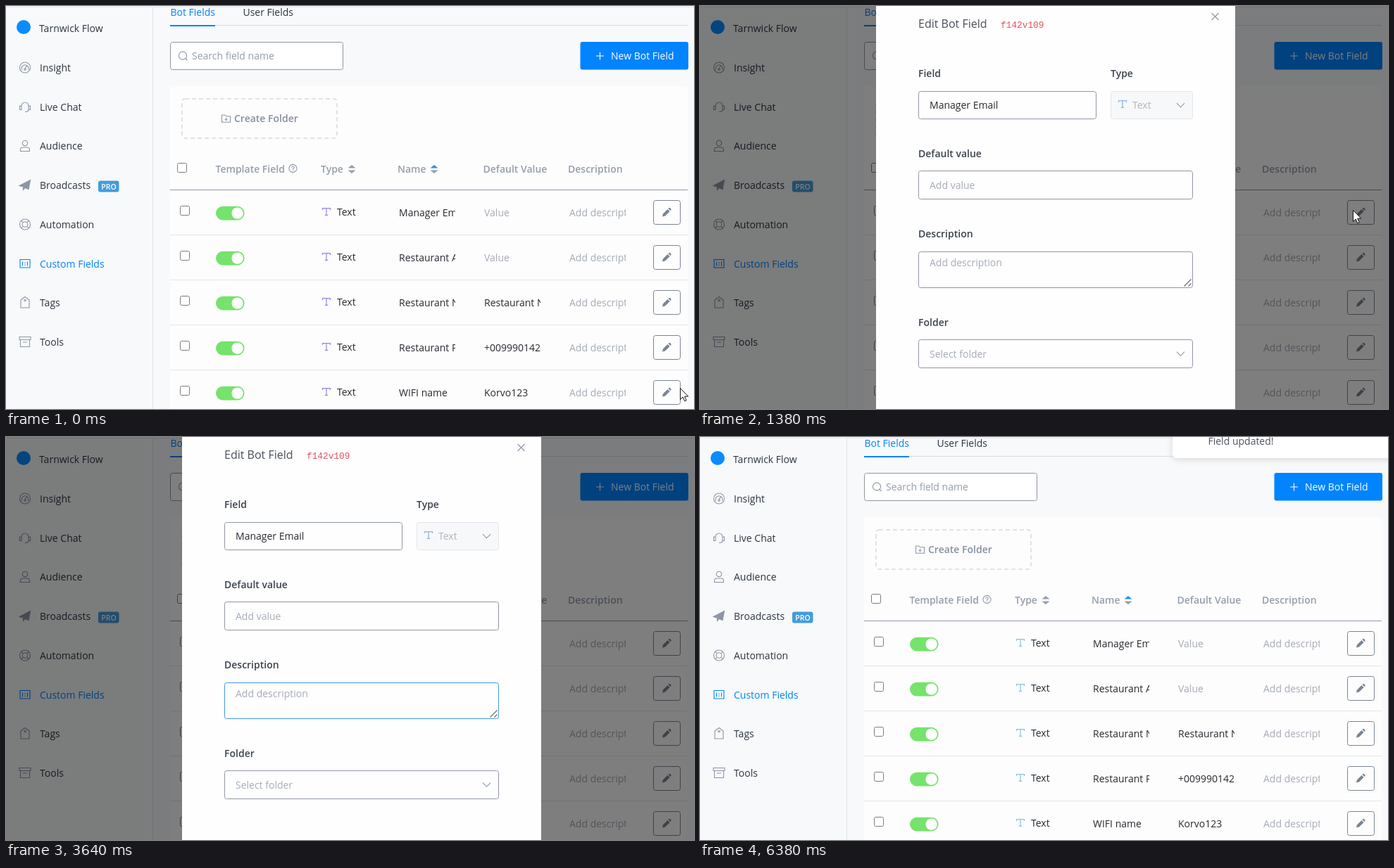
Animation of 977x573 px, one loop 7310 ms. Source, as an HTML page:

```html
<!DOCTYPE html>
<html lang="en">
<head>
<meta charset="utf-8">
<title>Edit bot field</title>
<style>
html, body { margin: 0; width: 100%; height: 100%; overflow: hidden; background: #f8f9fb; }
svg { display: block; }
#stage { position: absolute; left: 0; top: 0; }
text { font: 14px "Open Sans", sans-serif; white-space: pre; }
.bold { font-weight: 600; }
.line { fill: none; stroke: #8d96a5; stroke-width: 1.1; }
.tee { fill: none; stroke: #8f86ea; stroke-width: 1.2; }
.cool .tee { stroke: #86c2e6; }
.toast { filter: drop-shadow(0 2px 5px #0002); }
</style>
</head>
<body>
<svg id="stage" width="977" height="573" viewBox="0 0 977 573"></svg>
<script>
const BLUE = '#0084ff', INK = '#2d3541', DARK = '#272a30', MUTED = '#959eab', HINT = '#a6abb5', EDGE = '#8f97a5';
const PENCIL = '#7a8492';
const LOOP = 7310;

const text = (x, y, s, fill = INK, cls = '', more = '') =>
  `<text x="${x}" y="${y}" fill="${fill}" class="${cls}" ${more}>${s}</text>`;
const fillBox = (x, y, w, h, fill, r = 0, more = '') =>
  `<rect x="${x}" y="${y}" width="${w}" height="${h}" rx="${r}" fill="${fill}" ${more}/>`;
const box = (x, y, w, h, stroke = EDGE, r = 3, more = '', fill = 'none') =>
  fillBox(x + .5, y + .5, w - 1, h - 1, fill, r, `stroke="${stroke}" ${more}`);
const icon = (x, y, d, more = '') =>
  `<path class="line" transform="translate(${x} ${y})" d="${d}" ${more}/>`;
const rule = (y, color, x = 233, end = 968) => fillBox(x, y, end - x, 1, color);
const clipped = (x, y, s, fill) =>
  `<svg x="${x}" y="${y - 20}" width="80" height="30">${text(0, 20, s, fill)}</svg>`;
const circle = (r, x = 0, y = 0) => `M${x - r} ${y}a${r} ${r} 0 1 1 ${2 * r} 0a${r} ${r} 0 1 1 ${-2 * r} 0`;
const tee = (x, y, more = 'class="tee"') =>
  `<path ${more} transform="translate(${x} ${y})" d="M.5 3V.6H11.5V3M6 .6V10.4M3.8 10.4H8.2"/>`;
const sorter = (x, up) => `<g transform="translate(${x} 232)">
  <path d="M-5.5 -1.5L0 -6L5.5 -1.5Z" fill="${up}"/><path d="M-5.5 1.5L0 6L5.5 1.5Z" fill="${MUTED}"/></g>`;

function sidebar() {
  const items = [
    ['Tarnwick Flow'],
    ['Insight', circle(7.5) + 'M-4.5 3.5A5 5 0 1 1 4.5 3.5M0 2L2.5 -3' + circle(1.3, 0, 2.5)],
    ['Live Chat', 'M-5 1V-1.5A5 5 0 0 1 5 -1.5V1M-5 -1.5H-7.5V4H-5ZM5 -1.5H7.5V4H5ZM5 4Q5 7 0 7'],
    ['Audience', circle(3.7, 0, -3.6) + 'M-6.5 8V6Q-6.5 2.5 -3 2.5H3Q6.5 2.5 6.5 6V8Z'],
    ['Broadcasts', 'M-8 1L7.5 -7L5 6L0 4L-2.5 7V3L5 -4L-4 2.5Z', 'style="fill:#8d96a5"'],
    ['Automation', circle(7.5) + circle(3.8) + 'M-5.3 -5.3L-2.7 -2.7M5.3 -5.3L2.7 -2.7M-5.3 5.3L-2.7 2.7M5.3 5.3L2.7 2.7'],
    ['Custom Fields', 'M-7 -6H7V5.5H-7ZM-3.5 -3V3M3.5 -3V3M0 -2V-.5M0 1V2.5', `style="stroke:${BLUE}"`],
    ['Tags', 'M-6 -3.5L0 -8L6 -3.5V7.5H-6Z' + circle(1.2, 0, -3)],
    ['Tools', 'M-8 -7H8V-3H-8ZM-6.5 -3V7H6.5V-3M-3 .5H3']
  ];
  return fillBox(0, 0, 208, 573, '#f7f9fa') + fillBox(208, 2, 1, 571, '#e1e4e8') +
    items.map(([name, d, more], i) => {
      const y = Math.round(37 + 55.75 * i);
      const mark = d ? icon(27, y - 5.5, d, more) : `<circle cx="25" cy="30" r="10" fill="#0a8cff"/>`;
      return mark + text(i ? 48 : 47, y, name, i == 6 ? BLUE : INK);
    }).join('') +
    fillBox(131, 248.5, 29.5, 16, '#439bdc', 3) +
    text(146, 260.5, 'PRO', '#fff', 'bold', 'text-anchor="middle" style="font-size:10.5px"');
}

function row([name, value], i) {
  const pencil = 'M-6.5 6.5L-5.5 2.2L1.6 -5L5 -1.6L-2.2 5.5ZM2.6 -6L4 -7.2Q5 -7.6 6.3 -6.3Q7.6 -5 7.2 -4L6 -2.6Z';
  return `<g transform="translate(0 ${64 * i})">
    ${i ? rule(261, '#e2e5e9') : ''}
    ${box(247, 284, 14, 14, '#777c84', 2, '', '#fff')}
    ${fillBox(298, 284.8, 40.6, 19.6, '#75e36c', 9.8)}<circle cx="328.6" cy="294.6" r="8.2" fill="#fff"/>
    ${tee(449, 287)}${text(470, 298, 'Text', DARK)}
    ${clipped(558, 299, name, DARK)}
    ${clipped(679, 299, value || 'Value', value ? DARK : HINT)}
    ${clipped(800, 299, 'Add description', HINT)}
    <g id="edit${i}" fill="${PENCIL}">${box(919, 276, 39, 35, PENCIL)}
      <path transform="translate(938 293.5) scale(.92)" d="${pencil}"/></g></g>`;
}

function table() {
  const rows = [['Manager Email'], ['Restaurant Address'], ['Restaurant Name', 'Restaurant Name'],
    ['Restaurant Phone', '+009990142'], ['WIFI name', 'Korvo123']];
  const heads = [[297.5, 'Template Field'], [447, 'Type'], [556, 'Name'], [677.5, 'Default Value'], [798, 'Description']];
  return fillBox(233, 114, 735, 459, '#fdfdfd') +
    box(249.5, 131.5, 221, 57, '#d8dbdf', 4, 'stroke-width="1.6" stroke-dasharray="6 4"') +
    icon(312.5, 160, 'M-6 -5H-1.5L0 -3.2H6V5.2H-6ZM0 -1V3.4M-2.2 1.2H2.2') +
    text(324, 165, 'Create Folder', '#858f9e', 'bold') +
    box(243, 223, 14, 14, '#777c84', 2, '', '#fff') +
    heads.map(([x, s]) => text(x, 237, s, MUTED, 'bold')).join('') +
    icon(407.5, 231, circle(5.6) + 'M-1.8 -1.2Q-1.6 -3 0 -3Q1.8 -3 1.8 -1.4Q1.8 -.4 0 .6V1.4M0 2.4V3.4', 'stroke-width=".9"') +
    sorter(491, MUTED) + sorter(608, '#2b8fec') +
    fillBox(233, 262, 735, 63, '#f1f3f5', 0, 'id="rowHover"') +
    rule(261, '#9198a3') + rows.map(row).join('');
}

function page() {
  return fillBox(0, 0, 977, 573, '#f8f9fb') + sidebar() +
    rule(27, '#d8dce2') + fillBox(233, 27, 64, 2, BLUE) +
    text(233.5, 14, 'Bot Fields', BLUE) + text(336.5, 14, 'User Fields') +
    rule(1, '#e6e8eb', 0, 977) +
    box(233, 51, 246, 40, EDGE, 3, '', '#fff') +
    icon(251, 70.5, circle(5.6) + 'M4 4L6.5 6.5') +
    text(264, 76, 'Search field name', MUTED) +
    fillBox(815.5, 51, 153.5, 39.5, BLUE, 3) +
    icon(843.5, 71, 'M-5.5 0H5.5M0 -5.5V5.5', 'style="stroke:#fff"') +
    text(859, 76, 'New Bot Field', '#fff') + table();
}

function dialog() {
  const labels = [[310, 101, 'Field'], [583, 101, 'Type'], [310, 215, 'Default value'],
    [310, 329, 'Description'], [310, 455, 'Folder']];
  const chevron = y => icon(682.5, y, 'M-5.5 -2.8L0 2.8L5.5 -2.8');
  return fillBox(250, -30, 510, 640, '#fefefe') +
    text(310, 31, 'Edit Bot Field', '#4a4f58', '', 'style="font-size:16px"') +
    text(427, 31, 'f142v109', '#e0525f', '', 'style="font:12.8px \'Liberation Mono\',monospace"') +
    icon(731.5, 15, 'M-5 -5L5 5M5 -5L-5 5') +
    labels.map(([x, y, s]) => text(x, y, s, '#3b424d', 'bold')).join('') +
    box(310, 121, 253, 40, EDGE, 3, 'id="field"') + text(326, 146, 'Manager Email', DARK) +
    box(583, 121, 117, 40, '#e3e6eb', 3, '', '#f7f8f9') +
    tee(594, 134, 'fill="none" stroke="#8fb2ee" stroke-width="1.3"') + text(614, 146, 'Text', '#b0b5bd') + chevron(141) +
    box(310, 234, 390, 41, EDGE, 3, 'id="value"') + text(326, 260, 'Add value', HINT) +
    box(310, 349, 390, 52, EDGE, 3, 'id="about"') + text(326, 370, 'Add description', HINT) +
    icon(692.5, 393.5, 'M-5 5L5 -5M1 5L5 1', 'style="stroke:#666"') +
    box(310, 474, 390, 41) + text(326, 500, 'Select folder', HINT) + chevron(494.5) +
    box(310, 584, 390, 40);
}

const $ = id => document.getElementById(id);
const set = (id, attrs) => { for (const k in attrs) $(id).setAttribute(k, attrs[k]); };

$('stage').innerHTML = `<g id="page">${page()}</g>
  ${fillBox(0, 0, 977, 573, '#000', 0, 'id="shade"')}
  <g id="dialog">${dialog()}</g>
  <g id="toast">${fillBox(0, -40, 330, 70, '#fff', 6, 'class="toast"')}${text(50.5, 11, 'Field updated!', '#4d545f')}</g>
  <path id="cursor" d="M.5 .5V16.5L4.2 13L6.8 18.8L9.2 17.8L6.7 12.1H11.8Z" fill="#fff" stroke="#111"/>`;

// Each scene holds until the next one starts.
const open = { shade: .5, modal: 1 };
const onEdit = { cursor: [927, 290] };
const scenes = [
  { at: 0, cursor: [957, 543] },
  { at: 280, ...onEdit, hover: true },
  { at: 1070, ...onEdit, hover: true, rowHover: true, shade: .25, modal: .35 },
  { at: 1380, ...onEdit, ...open },
  { at: 2070, ...open, cursor: [352, 178] },
  { at: 2390, ...open, focus: 'field' },
  { at: 2780, ...open, focus: 'field', cursor: [341, 222] },
  { at: 3090, ...open, focus: 'value' },
  { at: 3640, ...open, focus: 'about' },
  { at: 4640, ...open },
  { at: 6220, modal: .035, toast: 687 },
  { at: 6380, toast: 671, cool: true }
];

function show({ cursor, hover, rowHover, shade = 0, modal = 0, focus, toast = 1000, cool }) {
  const [x, y] = cursor || [-50, -50];
  set('cursor', { transform: `translate(${x} ${y})` });
  set('rowHover', { opacity: rowHover ? 1 : 0 });
  set('edit0', { fill: hover ? '#d8dbdf' : PENCIL });
  $('edit0').firstElementChild.setAttribute('fill', hover ? '#8b939f' : 'none');
  set('shade', { opacity: shade });
  set('dialog', { opacity: modal, transform: `translate(0 ${-20 * (1 - modal)})` });
  set('toast', { transform: `translate(${toast} 0)` });
  set('page', { class: cool ? 'cool' : '' });
  for (const id of ['field', 'value', 'about']) set(id, { stroke: focus == id ? '#3f97e0' : EDGE });
}

const start = performance.now();
let last;
function tick() {
  const t = (performance.now() - start) % LOOP;
  const scene = scenes.findLast(s => s.at <= t);
  if (scene != last) show(last = scene);
  requestAnimationFrame(tick);
}
tick();
</script>
</body>
</html>
```
